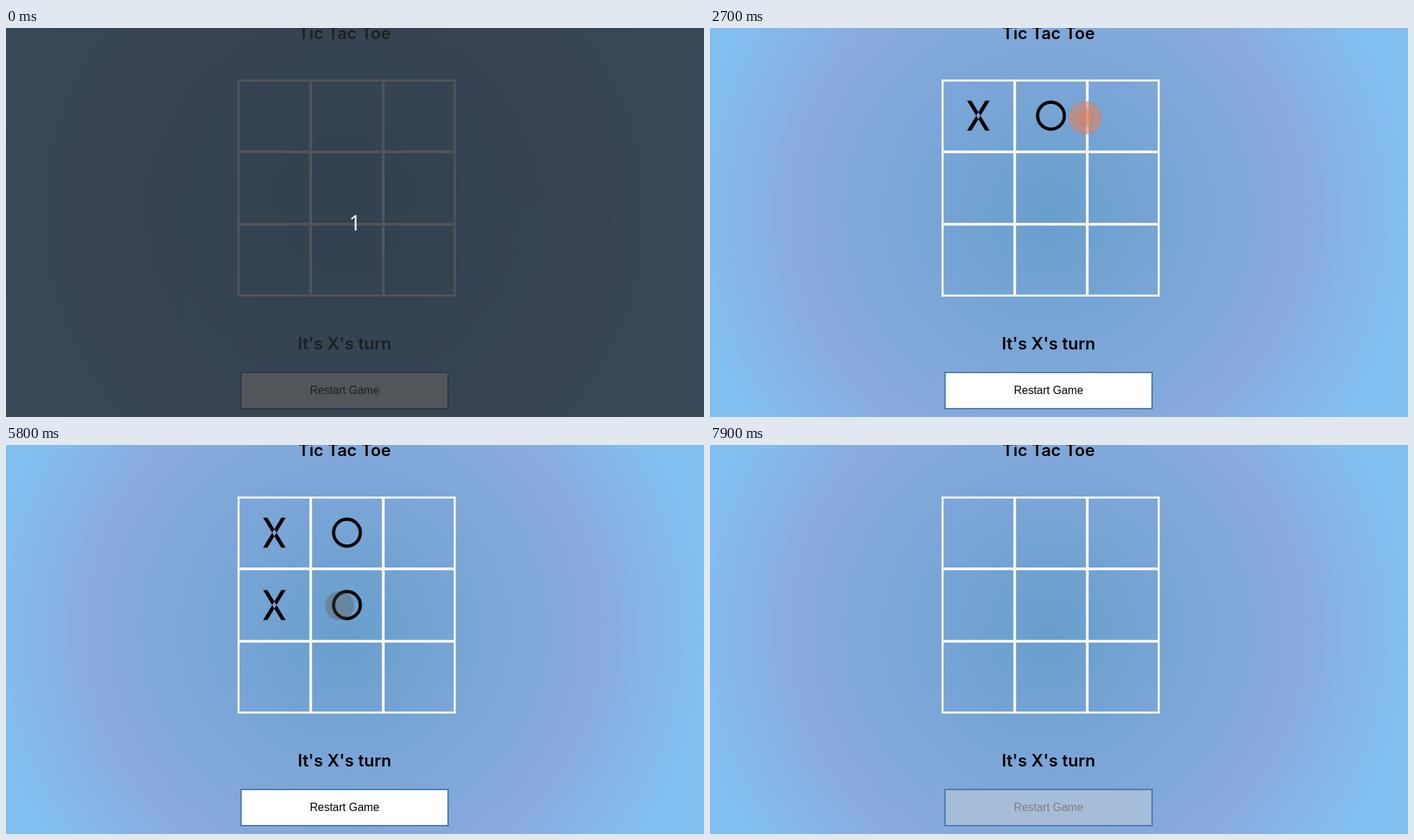
These frames come from a looping animation (1001x559 px, 8 s). An HTML page:

```html
<!DOCTYPE html>
<html lang="en">
<head>
<meta charset="utf-8">
<title>Tic Tac Toe</title>
<style>
  html, body { margin: 0; width: 100%; height: 100%; overflow: hidden; }
  body {
    background: radial-gradient(circle at 485px 265px,
      #689fcd 0, #7ba6d7 200px, #8aabde 365px, #81bff0 520px);
  }
  svg { display: block; position: absolute; left: 0; top: 0; }
  text { text-anchor: middle; }
  .head { font: 600 24px Inter, sans-serif; }
  .label { font: 16px "Liberation Sans", Arial, sans-serif; }
  .count { font: 30px "Noto Sans", sans-serif; fill: #eaf4fb; }
  .hidden { opacity: 0; }
</style>
</head>
<body>
<svg id="stage" width="1001" height="559" viewBox="0 0 1001 559">
  <text class="head" x="485.5" y="16">Tic Tac Toe</text>
  <path fill="#f5f5f5" shape-rendering="crispEdges" d="
    M332 74h3v312h-3z M435 74h4v312h-4z M539 74h4v312h-4z M642 74h3v312h-3z
    M332 74h313v3h-313z M332 176h313v4h-313z M332 280h313v4h-313z M332 383h313v3h-313z"/>
  <g id="marks"></g>
  <g id="status"></g>
  <rect id="button" x="337" y="495" width="297" height="52" fill="#fff" stroke="#4a7ab0" stroke-width="2"/>
  <text id="label" class="label" x="485.5" y="526">Restart Game</text>
  <g id="ripples"></g>
  <g id="countdown">
    <rect width="1001" height="559" fill="rgba(36, 41, 46, .79)"/>
    <text class="count" x="500.5" y="291">1</text>
  </g>
</svg>
<script>
const LOOP = 8000;
const CLEAR = 7400;
const $ = id => document.getElementById(id);

function add(parent, tag, attrs, text = '') {
  const el = document.createElementNS('http://www.w3.org/2000/svg', tag);
  for (const key in attrs) el.setAttribute(key, attrs[key]);
  el.textContent = text;
  parent.append(el);
  return el;
}

// rows: [time, properties]; the first and last states are held to the loop ends
function play(el, rows, easing = 'linear') {
  const all = [[0, rows[0][1]], ...rows, [LOOP, rows[rows.length - 1][1]]];
  const frames = all.map(([t, props]) => ({ offset: t / LOOP, easing, ...props }));
  el.animate(frames, { duration: LOOP, iterations: Infinity });
}

// Visible only during the given [from, to] spans
function show(el, ...spans) {
  el.classList.add('hidden');
  const rows = [[0, { opacity: 0 }]];
  for (const [from, to] of spans) {
    rows.push([from, { opacity: 1 }]);
    if (to < LOOP) rows.push([to, { opacity: 0 }]);
  }
  play(el, rows, 'step-end');
}

// Pointer position, press time, end of ripple, mark and its cell
const clicks = [
  { x: 374, y: 127, t: 1300, end: 2300, mark: 'X', col: 0, row: 0 },
  { x: 538, y: 129, t: 2300, end: 3500, mark: 'O', col: 1, row: 0 },
  { x: 380, y: 241, t: 3700, end: 4700, mark: 'X', col: 0, row: 1 },
  { x: 478.5, y: 231, t: 4700, end: 5900, mark: 'O', col: 1, row: 1 },
  { x: 396, y: 308, t: 5900, end: 7100, mark: 'X', col: 0, row: 2 }
];
const placed = c => c.t + 200;

function drawMark({ mark, col, row }) {
  const g = add($('marks'), 'g', { transform: `translate(${385 + col * 104} ${126 + row * 104})` });
  if (mark === 'X') {
    add(g, 'path', { d: 'M-16.3-21.5h6.2L16 21.5H9.8zM16-21.5H9.8L-16.3 21.5h6.2z' });
  } else {
    add(g, 'ellipse', { rx: 19.2, ry: 19.4, fill: 'none', stroke: '#000', 'stroke-width': 4.6 });
  }
  return g;
}

function drawRipple({ x, y, t, end }) {
  const g = add($('ripples'), 'g', { transform: `translate(${x} ${y})` });
  const outer = add(g, 'circle', { r: 7, stroke: '#a06a58', 'stroke-opacity': .4 });
  const inner = add(g, 'circle', { r: 7, stroke: '#b06a50', 'stroke-opacity': .4 });
  const ring = (u, r, opacity, rgb) => [t + u, { r: r + 'px', opacity, fill: `rgb(${rgb})` }];
  play(outer, [
    ring(0, 7, 0, '232, 160, 136'),
    ring(100, 11, .6, '225, 150, 122'),
    ring(400, 23.5, .65, '215, 135, 105'),
    ring(750, 36.5, .3, '140, 105, 95'),
    ring(1000, 33, .1, '80, 85, 95'),
    ring(1100, 30, 0, '80, 85, 95')
  ]);
  play(inner, [
    ring(0, 7.3, .95, '236, 160, 136'),
    ring(400, 12, .5, '220, 130, 95'),
    ring(1000, 18.7, .45, '115, 92, 80'),
    ring(1100, 20.7, .33, '93, 78, 62'),
    ring(1200, 24, 0, '93, 78, 62')
  ]);
  show(g, [t, end]);
}

function addStatus(text, ...spans) {
  show(add($('status'), 'text', { class: 'head', x: 485.5, y: 461.5 }, text), ...spans);
}

for (const c of clicks) {
  show(drawMark(c), [placed(c), CLEAR]);
  drawRipple(c);
}

const [a, b, c, d, e] = clicks.map(placed);
addStatus("It's X's turn", [0, a], [b, c], [d, e], [CLEAR, LOOP]);
addStatus("It's O's turn", [a, b], [c, d]);
addStatus('Player X has won!', [e, CLEAR]);

show($('countdown'), [0, 100]);

// Button hover fades in, holds, and fades back
const fade = (from, to, late) => [
  [7050, { fill: from }], [7450, { fill: to }], [7750, { fill: to }], [LOOP, { fill: late }]
];
play($('button'), fade('#fff', '#4a7ab0', 'rgb(225, 233, 242)'));
play($('label'), fade('#000', '#fff', 'rgb(43, 43, 43)'));
</script>
</body>
</html>
```
